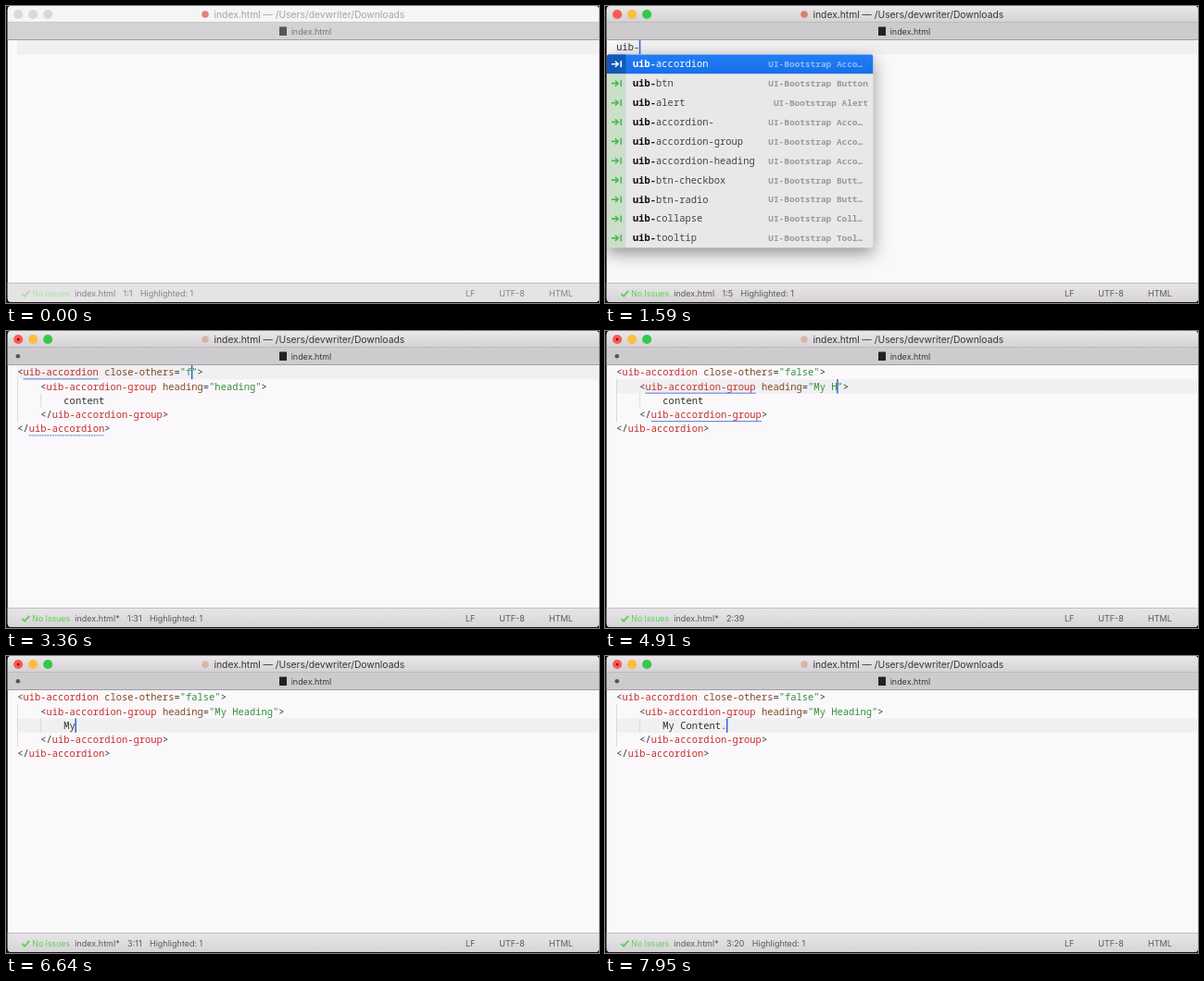
Recreate the animation shown at these times as an HTML page with a canvas. Size 640 by 321 pixels, loop 8 s.

```html
<!DOCTYPE html>
<html lang="en">
<head>
<meta charset="utf-8">
<title>Snippet completion</title>
<style>
html, body { margin: 0; width: 100%; height: 100%; overflow: hidden; background: #111; }
canvas { display: block; width: 100vw; height: 100vh; }
</style>
</head>
<body>
<canvas id="stage"></canvas>
<script>
const W = 640, H = 321, LOOP = 8000;
const FOCUS_AT = 430, MODIFIED_AT = 1790;
const EDGE = 1.8, LEFT = 12.2, TOP = 37, LINE = 15.25, CHAR = 6.27;
const MONO = '"Noto Sans Mono", monospace', SANS = 'Inter, sans-serif';
const CODE = `500 10.45px ${MONO}`, CODE_BOLD = `bold 10.45px ${MONO}`, LABEL = `600 9.45px ${MONO}`;
const INK = { p: '#333', t: '#c4302f', a: '#7d4c22', s: '#35903f' };

const canvas = document.getElementById('stage');
const ctx = canvas.getContext('2d');
const scale = window.devicePixelRatio || 1;
canvas.width = W * scale;
canvas.height = H * scale;

// Each step sets the text of one field: 0 prefix, 1 close-others, 2 heading, 3 content.
const steps = [{ time: 0, field: 0, value: '' }];
function type(field, text, start, gap) {
  for (let i = 0; i < text.length; i++)
    steps.push({ time: start + i * gap, field, value: text.slice(0, i + 1) });
}
function select(field, value, time) {
  steps.push({ time, field, value, selected: true });
}
type(0, 'uib-', 1060, 143);
select(1, 'true', 2560);
type(1, 'false', 3330, 100);
select(2, 'heading', 3950);
type(2, 'My Heading', 4450, 125);
select(3, 'content', 5850);
type(3, 'My Content.', 6500, 125);

const tagItems = ['accordion', 'btn', 'alert', 'accordion-', 'accordion-group', 'accordion-heading',
  'btn-checkbox', 'btn-radio', 'collapse', 'tooltip'].map(name => {
  const kind = name.split('-')[0];
  const title = 'UI-Bootstrap ' + (kind === 'btn' ? 'Button' : kind[0].toUpperCase() + kind.slice(1));
  const whole = name === 'btn' || name === 'alert';
  return { name: 'uib-' + name, label: whole ? title : title.slice(0, 17) + '…' };
});
const wordItems = [{ name: 'content', label: 'Content' }, { name: 'caption', label: 'Caption' }];

function rect(x, y, w, h, color) {
  ctx.fillStyle = color;
  ctx.fillRect(x, y, w, h);
}
function disc(x, y, r, color) {
  ctx.fillStyle = color;
  ctx.beginPath();
  ctx.arc(x, y, r, 0, Math.PI * 2);
  ctx.fill();
}
function text(str, x, y, font, color) {
  ctx.font = font;
  ctx.fillStyle = color;
  ctx.fillText(str, x, y);
  return ctx.measureText(str).width;
}
function stroke(points, color, width) {
  ctx.strokeStyle = color;
  ctx.lineWidth = width;
  ctx.beginPath();
  points.forEach(([x, y], i) => i ? ctx.lineTo(x, y) : ctx.moveTo(x, y));
  ctx.stroke();
}
function verticalGradient(y0, y1, from, to) {
  const g = ctx.createLinearGradient(0, y0, 0, y1);
  g.addColorStop(0, from);
  g.addColorStop(1, to);
  return g;
}
const column = n => LEFT + n * CHAR;
const rowTop = n => TOP + n * LINE;

function drawChrome(focused, modified) {
  rect(0, 0, W, 18, focused ? verticalGradient(0, 18, '#eae8ea', '#d3d1d3') : '#f6f5f6');
  rect(0, 17, W, 20, focused ? '#cdcbcd' : '#d4d2d4');
  rect(0, 17, W, 0.7, focused ? '#b5b3b5' : '#c9c7c9');
  rect(0, 36, W, 1, '#a19fa1');
  const lights = focused ? ['#fb5b55', '#fdbd3d', '#35c84a'] : ['#dad8da', '#dad8da', '#dad8da'];
  lights.forEach((color, i) => disc(13.2 + i * 16, 9, 5.1, color));
  if (modified) {
    disc(13.2, 9, 1.5, '#7d1512');
    disc(12.9, 27.3, 2.3, '#555');
  }
  ctx.globalAlpha = modified ? 0.4 : 0.85;
  disc(215, 9, 3.8, '#d8735a');
  ctx.globalAlpha = 1;
  text('index.html — /Users/devwriter/Downloads', 224.5, 12.7, `10.3px ${SANS}`, focused ? '#363436' : '#a6a4a6');
  rect(295, 22.5, 8, 9.5, focused ? '#222' : '#555');
  text('index.html', 307.7, 30.5, `8.95px ${SANS}`, focused ? '#383638' : '#777');
}

function drawStatus(focused, modified, parts) {
  rect(0, 299, W, 21, focused ? verticalGradient(299, 320, '#e8e6e8', '#d6d4d6') : '#e5e3e5');
  rect(0, 299, W, 1, '#c0bec0');
  const font = `9px ${SANS}`;
  const ink = focused ? '#5c5a5c' : '#858385';
  const green = focused ? '#5ed152' : '#a5e59d';
  stroke([[17.5, 311], [20.2, 313.6], [25.3, 307.8]], green, 1.9);
  text('No Issues', 28.3, 314, `8.75px ${SANS}`, green);
  let x = 74.3;
  for (const part of [modified ? 'index.html*' : 'index.html', ...parts])
    x += text(part, x, 314, font, ink) + 8.4;
  text('LF', 496, 314, font, ink);
  text('UTF-8', 532.3, 314, font, ink);
  text('HTML', 586, 314, font, ink);
}

// A line is a list of [ink, text] runs.
function drawLine(row, indent, runs) {
  let col = indent;
  for (const [ink, str] of runs) {
    text(str, column(col), rowTop(row) + 11.4, CODE, INK[ink]);
    col += str.length;
  }
}
function underline(row, col, length, dashed) {
  const y = rowTop(row) + 14.9;
  ctx.setLineDash(dashed ? [2, 0.8] : []);
  stroke([[column(col), y], [column(col + length), y]], '#5578df', 1);
  ctx.setLineDash([]);
}

function drawDocument(values, field) {
  const outer = 'uib-accordion', inner = 'uib-accordion-group';
  const attribute = (name, value) => [['p', ' '], ['a', name], ['p', '='], ['s', `"${value}"`]];
  rect(12.2, rowTop(1), 0.8, LINE * 3, '#d5d3d5');
  rect(37.3, rowTop(2), 0.8, LINE, '#d5d3d5');
  drawLine(0, 0, [['p', '<'], ['t', outer], ...attribute('close-others', values[1]), ['p', '>']]);
  drawLine(1, 4, [['p', '<'], ['t', inner], ...attribute('heading', values[2]), ['p', '>']]);
  drawLine(2, 8, [['p', values[3]]]);
  drawLine(3, 4, [['p', '</'], ['t', inner], ['p', '>']]);
  drawLine(4, 0, [['p', '</'], ['t', outer], ['p', '>']]);
  if (field === 1) {
    underline(0, 1, outer.length);
    underline(4, 2, outer.length, true);
  } else if (field === 2) {
    underline(1, 5, inner.length);
    underline(3, 6, inner.length);
  }
}

// Indices of the letters matched in order, or null.
function fuzzyMatch(name, query) {
  const hits = new Set();
  let from = 0;
  for (const letter of query) {
    const at = name.indexOf(letter, from);
    if (at < 0) return null;
    hits.add(at);
    from = at + 1;
  }
  return hits;
}

function drawPopup(x, y, width, items, query) {
  const rows = items.map(item => ({ ...item, hits: fuzzyMatch(item.name, query) })).filter(row => row.hits);
  const rowHeight = 20.9;
  ctx.save();
  ctx.beginPath();
  ctx.roundRect(x, y, width, rows.length * rowHeight, 3);
  ctx.shadowColor = 'rgba(0,0,0,.42)';
  ctx.shadowBlur = 18 * scale;
  ctx.shadowOffsetY = 6 * scale;
  ctx.fillStyle = '#e9e8e9';
  ctx.fill();
  ctx.shadowColor = 'transparent';
  ctx.clip();
  rows.forEach(({ name, label, hits }, i) => {
    const top = y + i * rowHeight, mid = top + rowHeight / 2, active = i === 0;
    if (active) rect(x, top, width, rowHeight, verticalGradient(top, top + rowHeight, '#217df4', '#186fea'));
    rect(x, top, 20.5, rowHeight + 0.2, active ? '#1259b8' : '#cbdfca');
    const arrow = active ? '#fff' : '#4fb552';
    stroke([[x + 5, mid], [x + 12, mid]], arrow, 1.7);
    stroke([[x + 9, mid - 3], [x + 12.3, mid], [x + 9, mid + 3]], arrow, 1.5);
    stroke([[x + 15.3, mid - 3.5], [x + 15.3, mid + 3.5]], arrow, 1.6);
    [...name].forEach((letter, n) => {
      const hit = hits.has(n);
      text(letter, x + 28 + n * CHAR, mid + 3.5, hit ? CODE_BOLD : CODE, active ? '#fff' : hit ? '#111' : '#444');
    });
    const room = label.endsWith('…') ? 19 : label.length;
    const labelX = x + width - 5.5 - room * 5.67;
    text(label, labelX, mid + 3.4, LABEL, active ? '#8dbcf8' : '#9b999b');
  });
  ctx.restore();
}

function draw(t) {
  const step = steps.findLast(s => s.time <= t);
  const values = ['', 'true', 'heading', 'content'];
  for (const s of steps) if (s.time <= t) values[s.field] = s.value;
  const { field, value, selected } = step;
  const focused = t >= FOCUS_AT, modified = t >= MODIFIED_AT;
  const row = Math.max(0, field - 1);
  const startCol = [0, 29, 34, 8][field];
  const endCol = startCol + value.length;

  ctx.setTransform(scale, 0, 0, scale, 0, 0);
  rect(0, 0, W, H, '#1c1517');
  ctx.save();
  ctx.beginPath();
  ctx.roundRect(EDGE, 0, W - EDGE, 320, 4);
  ctx.clip();
  rect(0, 0, W, H, '#faf8fa');
  drawChrome(focused, modified);

  if (selected) rect(column(startCol), rowTop(row), value.length * CHAR, LINE, '#b0def4');
  else rect(12, rowTop(row), W - 13, LINE, '#f0eff1');
  if (field === 0) drawLine(0, 0, [['p', value]]);
  else drawDocument(values, field);
  const idle = t - Math.max(step.time, FOCUS_AT);
  if (focused && !selected && idle % 800 < 400)
    rect(column(endCol) - 0.4, rowTop(row), 1.5, LINE, '#3264d6');

  const parts = [`${row + 1}:${endCol + 1}`];
  if (selected) parts.push(`(1, ${value.length})`);
  if (field !== 2 || selected) parts.push(`Highlighted: ${field === 2 ? 2 : 1}`);
  drawStatus(focused, modified, parts);

  if (field === 0 && value) drawPopup(2, 52.3, 287.5, tagItems, value);
  const word = /^My (C\w*)$/.exec(value);
  if (field === 3 && word) drawPopup(53.3, 82.7, 161.5, wordItems, word[1].toLowerCase());
  ctx.restore();
}

const startTime = performance.now();
function frame() {
  draw((performance.now() - startTime) % LOOP);
  requestAnimationFrame(frame);
}
frame();
</script>
</body>
</html>
```
